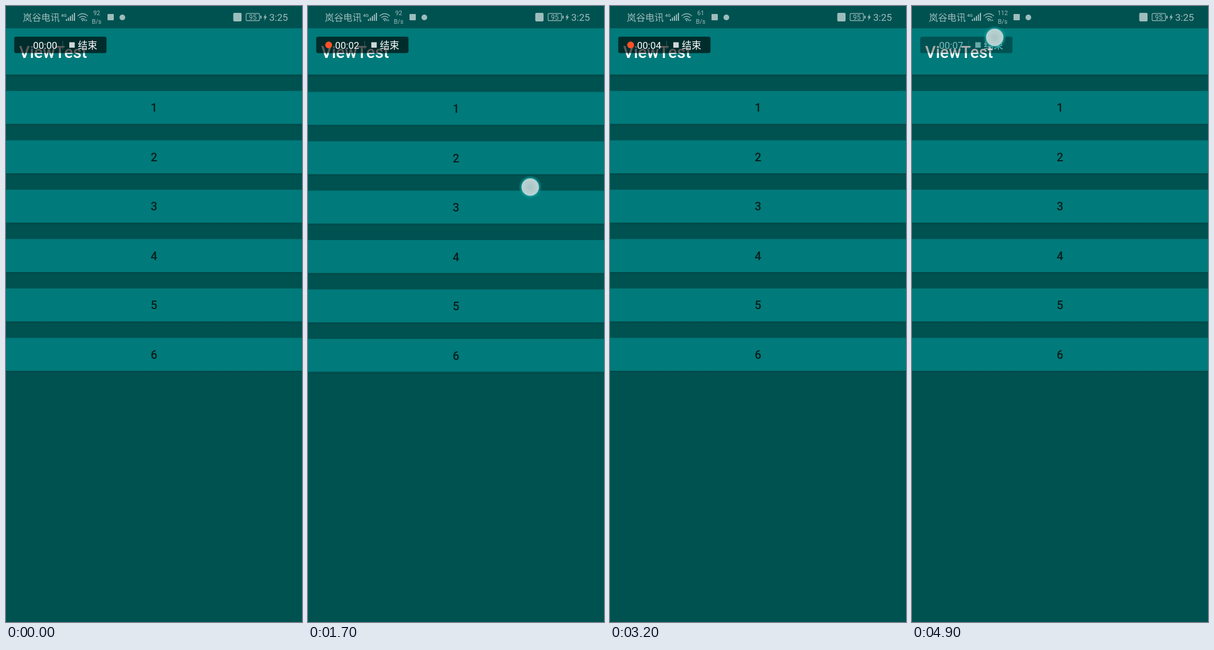
An HTML page for the animation above (5000 ms loop, 519 px wide and 1079 px high).

```html
<!DOCTYPE html>
<html lang="zh">
<head>
<meta charset="utf-8">
<title>ViewTest</title>
<style>
html, body { margin: 0; width: 100%; height: 100%; overflow: hidden; background: #005251; }
svg { display: block; width: 100%; height: 100%; font-family: Roboto, "Noto Sans CJK SC", "Noto Sans CJK", sans-serif; }
.mid { text-anchor: middle; }
</style>
</head>
<body>
<svg viewBox="0 0 519 1079">
  <defs>
    <linearGradient id="shade" x2="0" y2="1">
      <stop stop-opacity=".12"/><stop offset="1" stop-opacity="0"/>
    </linearGradient>
    <radialGradient id="glow">
      <stop offset=".7" stop-color="#22a8a8" stop-opacity=".9"/>
      <stop offset="1" stop-color="#009a9a" stop-opacity="0"/>
    </radialGradient>
    <radialGradient id="disc">
      <stop stop-color="#a8c4c5"/><stop offset="1" stop-color="#bdd3d3"/>
    </radialGradient>
  </defs>
  <rect width="519" height="1079" fill="#005251"/>
  <rect y="120" width="519" height="6" fill="url(#shade)"/>
  <g id="list"></g>
  <rect y="39" width="519" height="81" fill="#007a7a"/>
  <text x="23" y="90.8" font-size="28.8" font-weight="500" fill="#fff">ViewTest</text>

  <g fill="#9dbdbc">
    <text x="29.5" y="26" font-size="16.2">岚谷电讯</text>
    <text x="96.5" y="19" font-size="8" font-weight="500">4G</text>
    <path id="signal"/>
    <g fill="none" stroke="#9dbdbc" stroke-width="1.5">
      <path d="M125.5 17.5q9-8 18 0M128.5 20.5q6-5 12 0M131.5 23.5q3-2.5 6 0"/>
      <rect x="421" y="13.2" width="23.5" height="12.5" rx="2" stroke-width="1.2"/>
    </g>
    <path d="M132.5 24.5h4l-2 2.5zM137 25l2-2v4zM142.5 25l-2-2v4z"/>
    <text id="rate" class="mid" x="159" y="16" font-size="10.8"></text>
    <text class="mid" x="159" y="31" font-size="10.8">B/s</text>
    <rect x="178" y="14" width="11" height="11" rx="1"/>
    <circle cx="204" cy="20" r="5"/>
    <rect x="398.5" y="12" width="14.5" height="15" rx="2"/>
    <text class="mid" x="432.8" y="23.7" font-size="12">95</text>
    <path d="M446 17h2v5h-2zM455.5 13.5l-4 7h2.5l-1.5 5.5 5-7.5h-2.8z"/>
    <text x="461.5" y="26" font-size="17">3:25</text>
  </g>

  <g id="recorder">
    <rect x="14.4" y="53.7" width="161.8" height="28.7" rx="3.5" fill-opacity=".64"/>
    <circle id="lamp" cx="36.2" cy="68.3" r="6" fill="#ff5126"/>
    <text id="clock" x="47.5" y="74.5" font-size="17" fill="#fff"></text>
    <path d="M99.5 61v15" stroke="#385c5c"/>
    <rect x="111" y="63.5" width="9.5" height="9.5" fill="#cfd8d8"/>
    <text x="126" y="75" font-size="17" fill="#fff">结束</text>
  </g>

  <g id="touch">
    <circle r="20.5" fill="url(#glow)"/>
    <circle r="15.2" fill="url(#disc)"/>
  </g>
</svg>
<script>
const LOOP = 5000, STEP = 100;
const SETTLE = 300;  // spring-back time after release
const PULL = 0.4;    // list movement per pixel of finger movement
const REACH = 0.65;  // share of a drag spent moving; the rest is a hold
const TAP = 4900;
const $ = id => document.getElementById(id);

const drags = [
  { down: 94, up: 337, from: 315, to: 980 },
  { down: 794, up: 1201, from: 310, to: 990 },
  { down: 1694, up: 1901, from: 313, to: 1033 },
  { down: 2595, up: 2901, from: 247, to: 951 },
  { down: 3294, up: 3501, from: 280, to: 947 },
  { down: 3890, up: 4401, from: 302, to: 1029 }
];

const smooth = u => u * u * (3 - 2 * u);

$('signal').setAttribute('d', Array.from({ length: 5 }, (_, i) =>
  `M${105 + 3.5 * i} 26v${-3 - 2.75 * i}h2V26z`).join(''));

$('list').innerHTML = Array.from({ length: 6 }, (_, i) => `
  <g transform="translate(0 ${148.8 + i * 86.5})">
    <rect width="519" height="57.7" fill="#007a7a"/>
    <rect y="57.7" width="519" height="5" fill="url(#shade)"/>
    <text class="mid" x="259.5" y="36.7" font-size="20.2" font-weight="500" fill="#061d1d">${i + 1}</text>
  </g>`).join('');

function poseAt(t) {
  const drag = drags.find(d => t >= d.down && t < d.up + SETTLE);
  if (!drag) return { offset: 0, finger: t >= TAP ? [145, 55] : null };
  const { down, up, from, to } = drag;
  const progress = smooth(Math.min(1, (t - down) / (REACH * (up - down))));
  const travel = (to - from) * progress;
  if (t >= up) return { offset: PULL * travel * (1 - (t - up) / SETTLE) ** 2 };
  const x = 377 + 0.041 * from - 36 * progress;
  return { offset: PULL * travel, finger: [x, from + travel] };
}

function draw(now) {
  const t = Math.floor(now % LOOP / STEP) * STEP;
  const { finger, offset } = poseAt(t);
  $('list').setAttribute('transform', `translate(0 ${offset.toFixed(2)})`);
  $('touch').style.display = finger ? '' : 'none';
  if (finger) $('touch').setAttribute('transform', `translate(${finger})`);

  // The recorder's clock runs at one and a half times the playback speed.
  const seconds = t * 0.0015 + 0.15;
  $('clock').textContent = '00:0' + Math.floor(seconds);
  $('lamp').style.display = seconds % 1 > 0.58 ? '' : 'none';
  $('recorder').setAttribute('opacity', t >= TAP ? 0.5 : 1);
  $('rate').textContent = [92, 61, 112][Math.floor(t / 2000)];
}

const start = performance.now();
function tick() {
  draw(performance.now() - start);
  requestAnimationFrame(tick);
}
tick();
</script>
</body>
</html>
```
